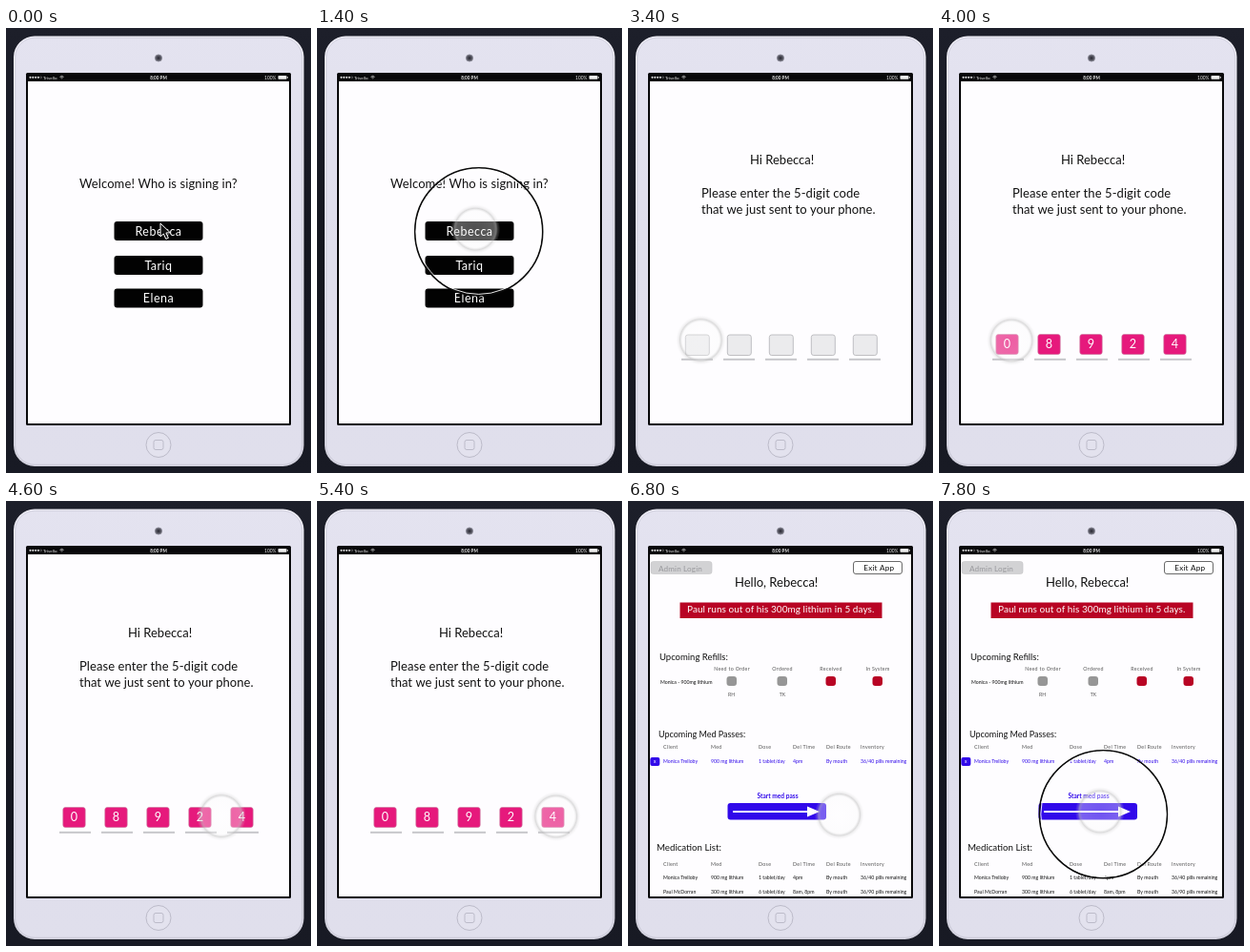
These frames come from a looping animation (320x467 px, 8000 ms). An HTML page with a canvas:

```html
<!DOCTYPE html>
<html lang="en">
<head>
<meta charset="utf-8">
<title>Tablet sign-in walkthrough</title>
<style>
html, body { margin: 0; width: 100%; height: 100%; overflow: hidden; background: #14161f; }
canvas { display: block; width: 320px; height: 467px; }
</style>
</head>
<body>
<canvas id="stage"></canvas>
<script>
const W = 320, H = 467, LOOP = 8000, STEP = 200;
const BLUE = '#3109ea', RED = '#b80424', PINK = '#e6197c', GREY = '#969696';
const canvas = document.getElementById('stage');
const ctx = canvas.getContext('2d');
const dpr = Math.max(1, window.devicePixelRatio || 1);
canvas.width = W * dpr;
canvas.height = H * dpr;

// Pointer moves: start time, destination, decay constant
const MOVES = [
  [0, 242, 222, 90],
  [700, 165.5, 211, 150],
  [2300, 76, 328, 200],
  [4250, 251, 331, 180],
  [6710, 168.5, 326, 205]
];
const CODE = '08924';
const COLUMNS = [37, 87, 137, 173, 208, 244];
const HEADINGS = ['Client', 'Med', 'Dose', 'Del Time', 'Del Route', 'Inventory'];
const DOSE_A = ['Monica Trelloby', '900 mg lithium', '1 tablet/day', '4pm', 'By mouth', '36/40 pills remaining'];
const DOSE_B = ['Paul McDorran', '300 mg lithium', '6 tablet/day', '8am, 8pm', 'By mouth', '36/90 pills remaining'];

function box(x, y, w, h, r, fill, stroke, line = 1) {
  ctx.beginPath();
  ctx.roundRect(x, y, w, h, r);
  if (fill) { ctx.fillStyle = fill; ctx.fill(); }
  if (stroke) { ctx.strokeStyle = stroke; ctx.lineWidth = line; ctx.stroke(); }
}

function circle(x, y, r, fill, stroke, line = 1) {
  ctx.beginPath();
  ctx.arc(x, y, r, 0, Math.PI * 2);
  if (fill) { ctx.fillStyle = fill; ctx.fill(); }
  if (stroke) { ctx.strokeStyle = stroke; ctx.lineWidth = line; ctx.stroke(); }
}

function text(str, x, y, size, { color = '#111', align = 'left', spacing = 0, weight = 400 } = {}) {
  ctx.font = `${weight} ${size}px Lato, "Open Sans", sans-serif`;
  ctx.letterSpacing = spacing + 'px';
  ctx.textAlign = align;
  ctx.fillStyle = color;
  ctx.fillText(str, x, y);
}

function polygon(points, fill, stroke) {
  ctx.beginPath();
  points.forEach(([x, y]) => ctx.lineTo(x, y));
  ctx.closePath();
  ctx.fillStyle = fill;
  ctx.fill();
  if (stroke) { ctx.strokeStyle = stroke; ctx.lineWidth = 1; ctx.stroke(); }
}

function verticalFade(...colors) {
  const fade = ctx.createLinearGradient(0, 0, 0, H);
  colors.forEach((color, i) => fade.addColorStop(i / (colors.length - 1), color));
  return fade;
}

function drawTablet() {
  ctx.fillStyle = verticalFade('#1d1f2a', '#151720', '#181a24');
  ctx.fillRect(0, 0, W, H);

  box(8, 8.5, 304.5, 451.5, 22, verticalFade('#f3f2fa', '#e9e8f2', '#d3d2de'));
  box(9.7, 10.2, 301, 448, 20.5, verticalFade('#e4e3f0', '#dfdeec', '#e0dfec'), '#cbcad8', 0.8);
  circle(160, 31.5, 3.6, '#55555f', '#8b8b98', 0.8);
  circle(160, 31.5, 1.6, '#34343e');
  circle(160, 437.5, 13, '#e3e2ee', '#bcbbc9', 1);
  box(155, 432.5, 10, 10, 2, null, '#bcbbc9', 1);

  box(21, 47, 278, 370, 1.5, '#08080a');
  ctx.fillStyle = '#fefdff';
  ctx.fillRect(23, 56, 274, 359);
}

function drawStatusBar() {
  const white = { color: '#eee' };
  for (let i = 0; i < 5; i++) {
    circle(25.5 + i * 2.8, 51.8, 0.9, i < 4 ? '#eee' : null, '#eee', 0.3);
  }
  text('Trivello', 39, 53.6, 4.6, white);
  for (let i = 0; i < 3; i++) {
    ctx.beginPath();
    ctx.arc(58.5, 53.4, 0.5 + i * 1.2, -Math.PI * 0.75, -Math.PI * 0.25);
    ctx.strokeStyle = '#eee';
    ctx.lineWidth = 0.7;
    ctx.stroke();
  }
  text('8:00 PM', 160, 53.6, 4.6, { ...white, align: 'center', weight: 700 });
  text('100%', 283.5, 53.6, 4.9, { ...white, align: 'right' });
  box(285.5, 50, 9, 3.8, 0.8, '#eee');
  ctx.fillRect(295, 51.1, 0.8, 1.6);
}

function drawSignIn() {
  text('Welcome! Who is signing in?', 77, 168, 13, { spacing: 0.1 });
  [['Rebecca', 203], ['Tariq', 239], ['Elena', 273.5]].forEach(([name, y]) => {
    box(113.5, y, 93, 20, 3, '#020202');
    text(name, 160, y + 14.7, 12.5, { color: '#fff', align: 'center', spacing: 0.5 });
  });
}

function drawCode(filled) {
  text('Hi Rebecca!', 128, 142.5, 13);
  text('Please enter the 5-digit code', 77, 177.5, 13, { spacing: 0.08 });
  text('that we just sent to your phone.', 77, 194.5, 13, { spacing: 0.02 });
  [...CODE].forEach((digit, i) => {
    const x = 72.5 + i * 44;
    ctx.fillStyle = '#c6c6ca';
    ctx.fillRect(x - 16.5, 346.8, 33, 2);
    if (filled) {
      box(x - 12.7, 321.5, 23.4, 21, 2.5, PINK, '#c9739b', 0.6);
      text(digit, x - 1, 336.4, 12.6, { color: '#fff', align: 'center' });
    } else {
      box(x - 12.2, 322, 25, 21.5, 2.5, '#ebebed', '#b9b9bd', 0.9);
    }
  });
}

function tableRow(cells, y, color, size = 5.2, spacing = 0) {
  cells.forEach((cell, i) => text(cell, COLUMNS[i], y, size, { color, spacing }));
}

function drawDashboard() {
  box(24, 63.5, 64, 13, 2.5, '#d2d2d4', '#c4c4c7', 0.6);
  text('Admin Login', 55, 73.6, 8.1, { color: '#98989c', align: 'center', spacing: 0.15 });
  box(236.5, 63.5, 51, 13, 2.5, '#fff', '#444', 0.8);
  text('Exit App', 263.3, 73.2, 8.2, { align: 'center', spacing: 0.2 });
  text('Hello, Rebecca!', 112, 90, 13);

  ctx.fillStyle = RED;
  ctx.fillRect(54.5, 106.5, 212, 16.5);
  text('Paul runs out of his 300mg lithium in 5 days.', 62, 117, 10, { color: '#fff', spacing: 0.05 });

  text('Upcoming Refills:', 33, 167, 9.5);
  [['Need to Order', 109, GREY], ['Ordered', 162, GREY],
   ['Received', 213, RED], ['In System', 262, RED]].forEach(([label, x, color]) => {
    text(label, x, 178, 5.3, { color: '#555', align: 'center', spacing: 0.3 });
    box(x - 5.5, 184, 10.5, 10, 3, color);
  });
  text('Monica - 900mg lithium', 34, 192, 5.2);
  text('RH', 108.5, 204.5, 5.2, { color: '#555', align: 'center' });
  text('TK', 162, 204.5, 5.2, { color: '#555', align: 'center' });

  text('Upcoming Med Passes:', 32, 248, 9);
  tableRow(HEADINGS, 260.3, '#555', 5.3, 0.3);
  tableRow(DOSE_A, 275.2, BLUE);
  box(23.3, 269, 10, 9, 2, BLUE);
  text('x', 28.2, 275.3, 5.5, { color: '#fff', align: 'center' });

  text('Start med pass', 157, 312, 6.6, { color: BLUE, align: 'center', weight: 700 });
  box(104.5, 317, 103.5, 17.5, 3, BLUE);
  ctx.fillStyle = '#fff';
  ctx.fillRect(110, 325, 80, 2);
  polygon([[188, 320.5], [201, 326], [188, 331.5]], '#fff');

  text('Medication List:', 30, 367, 9.7);
  tableRow(HEADINGS, 383, '#555', 5.3, 0.3);
  tableRow(DOSE_A, 396.7, '#111');
  tableRow(DOSE_B, 411.5, '#111');
}

function drawCursor(x, y) {
  polygon([[x, y], [x, y + 14], [x + 3.3, y + 11], [x + 5.8, y + 16.5],
    [x + 8.4, y + 15.3], [x + 5.9, y + 10], [x + 10.3, y + 9.8]], '#111', '#fff');
}

function touchAt(t) {
  let x = 163, y = 213;
  for (const [start, toX, toY, tau] of MOVES) {
    if (t < start) break;
    const p = 1 - Math.exp((start - t) / tau);
    x += (toX - x) * p;
    y += (toY - y) * p;
  }
  return [x, y];
}

function drawTouch(x, y, pressed) {
  const glow = ctx.createRadialGradient(x, y, 0, x, y, 26);
  glow.addColorStop(0, 'rgba(255,255,255,0.3)');
  glow.addColorStop(0.74, 'rgba(250,250,250,0.36)');
  glow.addColorStop(0.84, 'rgba(195,195,195,0.58)');
  glow.addColorStop(0.9, 'rgba(205,205,205,0.25)');
  glow.addColorStop(1, 'rgba(220,220,220,0)');
  circle(x, y, 26, glow);
  if (pressed) {
    circle(x + 3.5, y + 2.7, 67, null, '#0a0a0a', 1.6);
    circle(x + 3.5, y + 2.7, 65.6, null, '#fff', 0.9);
  }
}

function draw(t) {
  ctx.setTransform(dpr, 0, 0, dpr, 0, 0);
  drawTablet();
  drawStatusBar();
  if (t < 1600) drawSignIn();
  else if (t < 5600) drawCode(t >= 3800);
  else drawDashboard();

  if (t < 200) drawCursor(162, 205);
  else drawTouch(...touchAt(t), [1400, 3600, 7800].includes(t));
}

function tick(now) {
  draw(Math.floor((now % LOOP) / STEP) * STEP);
  requestAnimationFrame(tick);
}
draw(0);
requestAnimationFrame(tick);
</script>
</body>
</html>
```
